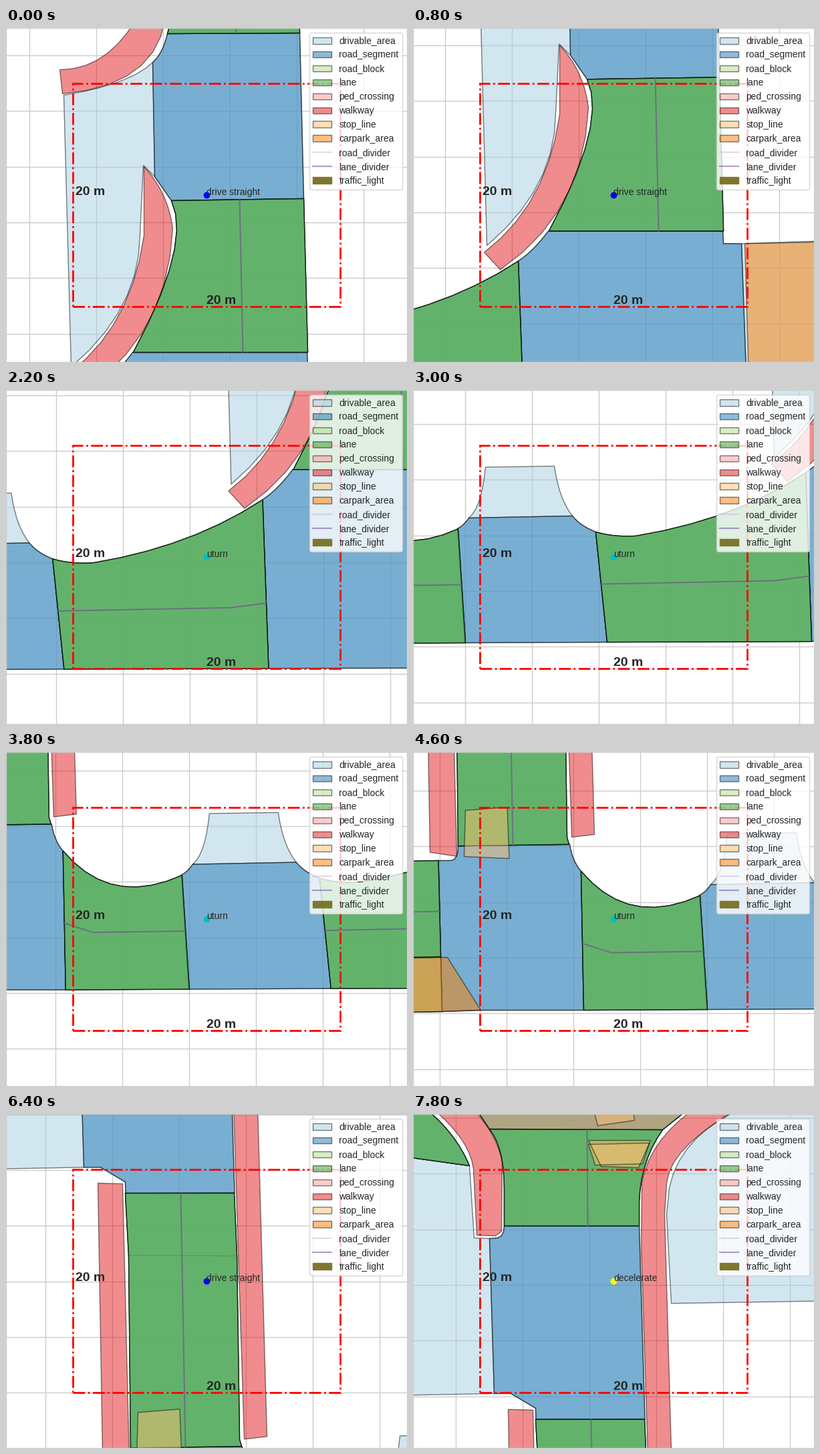
Write a matplotlib script that moves like this. It is 600 px wide and 500 px high and loops after 8 s.

```python
import matplotlib.pyplot as plt
import numpy as np
from matplotlib.animation import FuncAnimation
from matplotlib.lines import Line2D
from matplotlib.patches import Patch, Polygon, Rectangle

W, H, FRAMES, STEP = 600, 500, 40, 200
PX_X, PX_Y = 20, 50 / 3          # pixels per metre

plt.rcParams.update({
    "font.family": "Liberation Sans", "font.size": 10,
    "text.color": "0.15", "axes.edgecolor": "0.8", "axes.linewidth": 1,
})

COLORS = {
    "drivable_area": "#a6cee3", "road_segment": "#1f78b4",
    "road_block": "#b2df8a", "lane": "#33a02c",
    "ped_crossing": "#fb9a99", "walkway": "#e31a1c",
    "stop_line": "#fdbf6f", "carpark_area": "#ff7f00",
    "road_divider": "#cab2d6", "lane_divider": "#6a3d9a",
    "traffic_light": "#7e772e",
}
DEPTH = {name: 1 + i / 20 for i, name in enumerate(COLORS)}

# View shift at a few time steps; speeds follow from the neighbours.
TIMES = np.array([0, 7, 15, 23, 28, 32, 39])
SHIFTS = np.array([(-805, 399.7), (-732, 116.7), (-362, -7), (0, 0),
                   (110, 156.7), (119, 359.3), (124, 698)])
SPEEDS = np.gradient(SHIFTS, TIMES, axis=0, edge_order=2)
NORTH, EAST, SOUTH, WEST, _, UPPER, TOP = SHIFTS

ACTIONS = [(0, "drive straight", "b"), (5, "uturn", "c"),
           (30, "drive straight", "b"), (37, "decelerate", "yellow")]

fig = plt.figure(figsize=(W / 100, H / 100), dpi=100, facecolor="white")
ax = fig.add_axes([0, 0, 1, 1], xticks=[], yticks=[])
hud = fig.add_axes([0, 0, 1, 1], xlim=(0, W), ylim=(H, 0))
hud.axis("off")


def bend(a, pull, b, n=8):
    """Curb from a to b, drawn towards pull."""
    a, pull, b = map(np.array, (a, pull, b))
    return [(1 - u) ** 2 * a + 2 * u * (1 - u) * pull + u * u * b
            for u in np.linspace(0, 1, n)]


def place(origin, pts):
    return np.array(pts) - origin + 0.5


def fill(layer, origin, pts):
    ax.add_patch(Polygon(place(origin, pts), fc=COLORS[layer], ec="none",
                         alpha=0.5, zorder=DEPTH[layer]))


def outline(layer, origin, pts, closed=True):
    ax.add_patch(Polygon(place(origin, pts), closed=closed, fill=False,
                         ec="black", lw=1, alpha=0.5,
                         zorder=DEPTH[layer] + 0.001))


def area(layer, origin, pts):
    fill(layer, origin, pts)
    outline(layer, origin, pts)


def lot(origin, pts):
    """Open ground; its last side is shared with a road."""
    fill("drivable_area", origin, pts)
    outline("drivable_area", origin, pts, closed=False)


def road(origin, pts):
    for layer in ("drivable_area", "road_segment"):
        area(layer, origin, pts)


def block(origin, pts):
    road(origin, pts)
    area("road_block", origin, pts)


def lane(origin, pts):
    block(origin, pts)
    area("lane", origin, pts)


def divider(origin, *pts):
    x, y = place(origin, pts).T
    ax.plot(x, y, color=COLORS["lane_divider"], alpha=0.5, lw=1.5, zorder=2)
    ax.plot(x, y, color="0.45", alpha=0.5, lw=1, zorder=2)


def draw_grid():
    style = dict(color="0.8", lw=1, zorder=0.5)
    for k in range(-10, 15):
        ax.axvline(40.3 + 5 * PX_X * k, **style)
        ax.axhline(58.1 + 5 * PX_Y * k, **style)


def draw_north():
    lot(NORTH, [*bend((219, 51), (185, 84), (86, 100)), (97, 507),
                *bend((97, 507), (200, 420), (200, 308)),
                (205, 205), (222, 222)])
    road(NORTH, [(222, 222), *bend((219, 51), (234, 38), (241, 8)),
                 (439, 7), (445, 255), (247, 258)])
    lane(NORTH, [(445, 255), (451, 485),
                 *bend((190, 485), (278, 322), (247, 258))])
    lane(NORTH, [(241, 8), (439, 7), (438, -30), (252, -30)])
    divider(NORTH, (349, 256), (354, 485))
    divider(NORTH, (343, -30), (344, 8))
    area("walkway", NORTH, [*bend((80, 62), (150, 62), (195, -15)),
                            *bend((238, -15), (223, 86), (84, 98))])
    area("walkway", NORTH, [*bend((206, 207), (242, 245), (249, 300)),
                            *bend((249, 300), (242, 458), (117, 543)),
                            *bend((93, 517), (187, 446), (206, 310))])


def draw_east():
    road(EAST, [(523, 202), (524, 221), (551, 221), (561, 499), (226, 499.5),
                *bend((217, 247), (240, 232), (262, 202))])
    lot(EAST, [(551, 221), (703, 216), (703, 499), (561, 499)])
    area("carpark_area", EAST, [(556, 221), (700, 218), (700, 496),
                                (564, 496)])


def draw_south():
    lane(SOUTH, [*bend((273, 212), (300, 220), (333, 218)),
                 *bend((333, 218), (480, 194), (587, 123.5)),
                 (596, 376), (290, 377)])
    divider(SOUTH, (281, 290), (540, 285), (593, 278))
    road(SOUTH, [*bend((66, 207), (76, 202), (83, 191)),
                 *bend((238, 188), (250, 203), (273, 212)),
                 (290, 377), (77, 378)])
    lot(SOUTH, [*bend((83, 191), (102, 176), (108, 115)),
                *bend((211, 113.5), (218, 163), (238, 188))])


def draw_west():
    lane(WEST, [*bend((251, 178), (322, 263), (429, 214.5), 10),
                (440, 385), (255, 386)])
    divider(WEST, (253, 286), (296, 300), (434, 298))
    road(WEST, [*bend((234, 138), (238, 163), (251, 178)), (255, 386),
                (100, 386), (43, 388), (37.5, 162),
                *bend((55, 162), (67, 162), (67, 140))])
    lane(WEST, [(37.5, 162), (41, 306), (-150, 310), (-150, 166)])
    divider(WEST, (-150, 242), (40, 238))
    block(WEST, [(41, 306), (43, 388), (-150, 392), (-150, 310)])
    area("carpark_area", WEST, [(-150, 311), (51, 307), (101, 386),
                                (43, 388), (-150, 392)])
    area("stop_line", WEST, [(78, 87), (140.5, 82), (143.5, 159), (76, 156)])


def draw_upper():
    lane(UPPER, [(178, 118), (341, 118), (345, 212), (349, 487), (352, 497),
                 (186, 499.5), (183, 211)])
    outline("road_segment", UPPER, [(183, 211), (345, 212)])
    divider(UPPER, (261, 118), (268, 499))
    area("walkway", UPPER, [(137, 103), (174, 104), (184, 515), (144, 509)])


def draw_top():
    road(TOP, [(114, 186), *bend((126, 185), (136, 183), (136, 167), 4),
               (338, 167), (346.5, 456.5), (183.5, 457), (183, 440),
               (146, 418), (121, 418)])
    lot(TOP, [(114, 186), (91, 185), (84, 77), (-40, 60), (-40, 421),
              (121, 418)])
    lane(TOP, [*bend((10, -15), (62, 24), (84, 77)), (-30, 61), (-30, -15)])
    lane(TOP, [*bend((114, 22), (136, 50), (136, 110)), (136, 167),
               (338, 167), *bend((338, 130), (340, 70), (373, 23))])
    divider(TOP, (260, 22), (261, 167))
    crossing = [(96, -5), (114, 22), (373, 23), (408, -5)]
    lane(TOP, crossing)
    area("ped_crossing", TOP, crossing)
    lot(TOP, [*bend((490, -10), (398, 35), (383, 110)), (379, 150),
              (386, 283), (640, 279), (640, -10)])
    area("walkway", TOP, [*bend((33, -5), (85, 40), (90, 82)), (95, 181),
                          (123, 182), (132, 175),
                          *bend((133, 70), (124, 30), (92, -5))])
    area("walkway", TOP, [*bend((416, -5), (352, 42), (342, 103)),
                          (341, 200), (361, 825), (395, 821), (376, 150),
                          *bend((379, 103), (384, 50), (482, -5))])
    area("stop_line", TOP, [(262, 39), (355, 39), (337, 80), (281, 78)])
    area("stop_line", TOP, [(262, 45), (353, 43), (343, 74), (272, 76)])
    area("stop_line", TOP, [(270, -5), (276, 17), (331, 9), (329, -5)])


def legend_handle(name):
    color = COLORS[name]
    if "divider" in name:
        return Line2D([], [], color=color, alpha=0.5, label=name)
    if name == "traffic_light":
        return Patch(color=color, label=name)
    return Patch(fc=color, ec="black", alpha=0.5, label=name)


def draw_hud():
    half_x, half_y, gap = 10 * PX_X, 10 * PX_Y, 0.2
    hud.add_patch(Rectangle((W / 2 - half_x, H / 2 + half_y), 2 * half_x,
                            -2 * half_y, fill=False, ec="red", lw=2,
                            ls="-."))
    style = dict(size=14, weight="bold")
    hud.text(W / 2 - half_x + gap * PX_X, H / 2, "20 m", **style)
    hud.text(W / 2, H / 2 + half_y - gap * PX_Y, "20 m", **style)
    hud.legend(handles=[legend_handle(n) for n in COLORS], loc="upper right")


def view_shift(t):
    """Cubic Hermite curve through the key shifts."""
    i = min(np.searchsorted(TIMES, t, side="right"), len(TIMES) - 1) - 1
    span = TIMES[i + 1] - TIMES[i]
    u = (t - TIMES[i]) / span
    ease = u * u * (3 - 2 * u)
    return ((1 - ease) * SHIFTS[i] + ease * SHIFTS[i + 1]
            + span * u * (1 - u) * ((1 - u) * SPEEDS[i] - u * SPEEDS[i + 1]))


for draw in (draw_grid, draw_north, draw_east, draw_south, draw_west,
             draw_upper, draw_top, draw_hud):
    draw()
car, = hud.plot([W / 2], [H / 2], "o", ms=6, mew=1)
action = hud.text(W / 2, H / 2, "")


def update(t):
    dx, dy = view_shift(t)
    ax.set_xlim(-dx, W - dx)
    ax.set_ylim(H - dy, -dy)
    _, label, color = [a for a in ACTIONS if a[0] <= t][-1]
    car.set_color(color)
    action.set_text(label)
    return car, action


anim = FuncAnimation(fig, update, frames=FRAMES, interval=STEP, repeat=True,
                     repeat_delay=0, blit=False)
plt.show()
```
